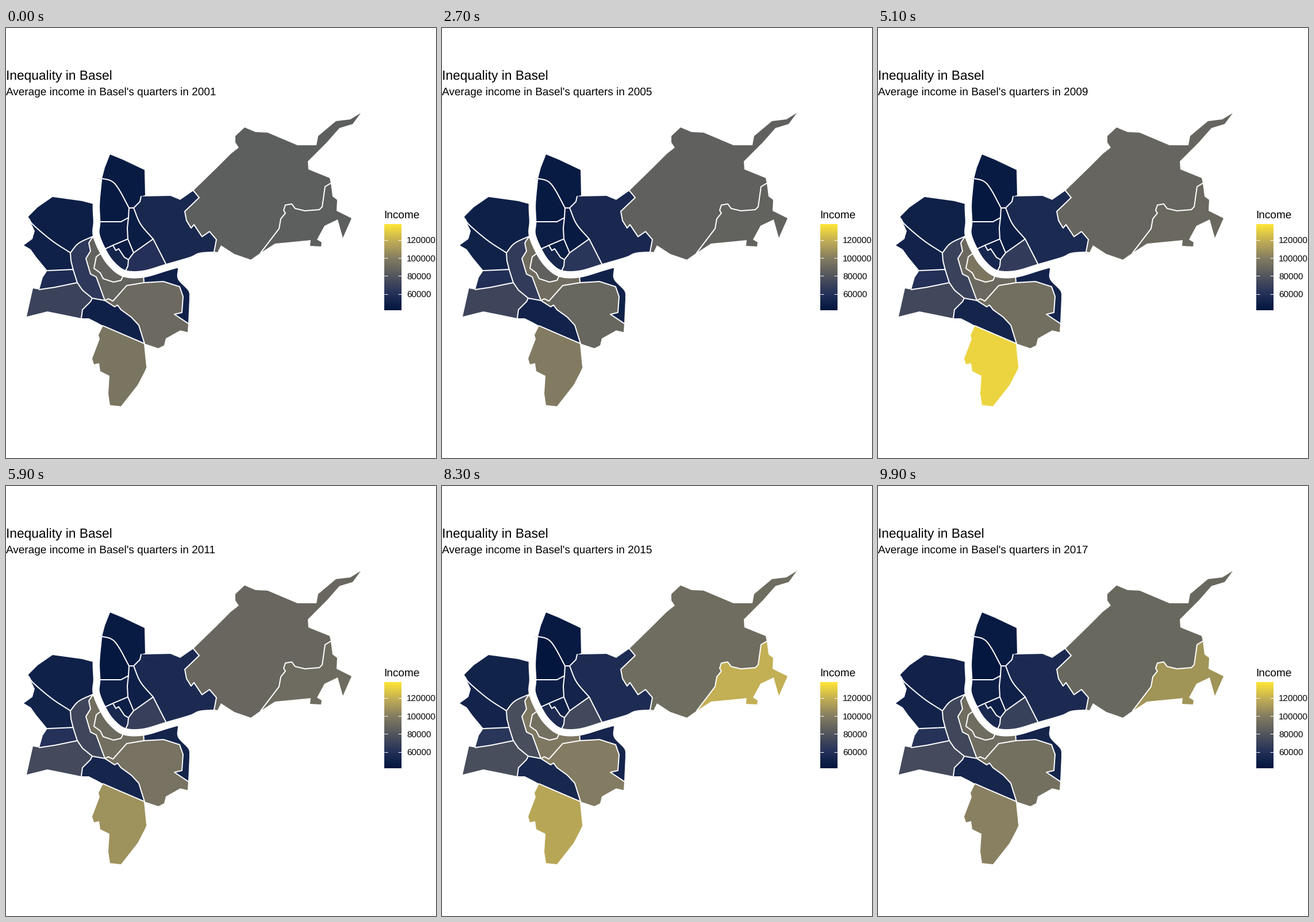
These frames come from a looping animation (748 px wide and 748 px high, 10000 ms). A matplotlib script:

```python
import matplotlib.pyplot as plt
import numpy as np
from matplotlib.animation import FuncAnimation
from matplotlib.collections import LineCollection, PolyCollection
from matplotlib.colors import LinearSegmentedColormap

SIZE = 748
FRAMES, INTERVAL = 100, 100
HOLD, MOVE = 3, 3  # frames a year rests, frames it blends into the next
YEARS = np.arange(2001, 2018)
LOW, HIGH = 41.85, 136.9  # income scale in thousands
STEPS = 8  # curve samples between two key points

plt.rcParams["font.family"] = "Liberation Sans"
plt.rcParams["text.hinting"] = "none"
cmap = LinearSegmentedColormap.from_list(
    "income", ["#02163e", "#263259", "#53565d", "#837c62", "#bfac56", "#ffe536"])

borders, rings, incomes = [], [], []


def path(*xy):
    return np.array(xy, float).reshape(-1, 2)


def smooth(*xy):
    """Catmull-Rom curve through the key points."""
    p = path(*xy)
    p = np.vstack([2 * p[0] - p[1], p, 2 * p[-1] - p[-2]])
    t = np.arange(STEPS)[:, None] / STEPS
    parts = [b + t * (c - a) / 2 + t**2 * (a - 2.5 * b + 2 * c - d / 2)
             + t**3 * (1.5 * (b - c) + (d - a) / 2)
             for a, b, c, d in zip(p, p[1:], p[2:], p[3:])]
    return np.vstack(parts + [p[-2:-1]])


def border(*xy, make=path):
    borders.append(make(*xy))
    return borders[-1]


def river(first, last):
    return stream[first * STEPS:last * STEPS + 1]


def trend(start, end, *shifts):
    """Income that grows until 2015, with (first, last, amount) shifts."""
    p = np.clip((YEARS - 2001) / 14, 0, 1)
    values = start + (end - start) * p**1.5
    for first, last, amount in shifts:
        values[(YEARS >= first) & (YEARS <= last)] += amount
    return values


def quarter(values, *parts):
    """Join the parts end to end, flipping each where needed."""
    ring = parts[0]
    for part in parts[1:]:
        to_start, to_end = np.hypot(*(part[[0, -1]] - ring[-1]).T)
        ring = np.vstack([ring, part[::-1] if to_end < to_start else part])
    rings.append(ring)
    incomes.append(values)


stream = smooth(161, 262, 157, 306, 158, 337, 157, 360, 169, 389, 184, 411,
                206, 427, 239, 428, 281, 416, 322, 404, 338, 397, 363, 395)

# Inner borders, north-east
riehen_hirz = border(326, 283, 336, 295, 311, 319, 314, 335, 322, 348, 327, 342,
                     341, 363, 354, 354, 366, 368, 362, 389)
riehen_bett = border(565, 270, 555, 276, 550, 311, 545, 316, 520, 318, 503, 314,
                     497, 306, 486, 308, 483, 317, 486, 322, 478, 332, 475, 349,
                     443, 391)

# Inner borders, right bank
klein_hirz = border(235, 293, 233, 302, 222, 313)
klein_klyb = border(162, 261, 183, 266, 196, 280, 214, 313, make=smooth)
klein_rose = border(214, 313, 222, 313)
rose_hirz = border(222, 313, 234, 341, 256, 367, make=smooth)
wett_hirz = border(256, 367, 281, 416)
klyb_matt = border(158, 337, 200, 337, 213, 330)
klyb_rose = border(214, 313, 213, 330)
matt_rose = border(213, 330, 211, 348, 212, 367)
matt_old = border(169, 389, 173, 384, 186, 378)
matt_clar = border(186, 378, 212, 367)
clar_old = border(186, 378, 191, 387, 196, 384, 206, 399, 213, 403)
clar_rose = border(212, 367, 222, 391)
clar_wett = border(222, 391, 213, 403)
old_wett = border(213, 403, 212, 414, 206, 427)
rose_wett = border(222, 391, 256, 367)

# Inner borders, left bank
joha_isel = border(40, 332, 48, 343, 80, 370, 112, 391, make=smooth)
joha_ring = border(112, 391, 127, 374, 157, 360, make=smooth)
isel_ring = border(112, 391, 113, 405, 117, 421)
isel_gott = border(72, 422, 117, 420)
gott_ring = border(117, 421, 124, 443)
gott_bach = border(58, 455, 85, 451, 124, 443)
bach_ring = border(124, 443, 133, 456, 150, 470)
bach_gund = border(150, 470, 147, 476, 133, 490, 131, 505)
ring_gund = border(150, 470, 172, 474)
ring_vors = border(157, 360, 149, 366, 144, 374, 147, 388, 139, 401, 147, 428,
                   157, 433, 172, 474)
vors_alts = border(169, 389, 157, 398, 153, 418, 164, 426, 169, 436, 187, 442,
                   200, 439, 206, 427)
vors_brei = border(239, 428, 240, 443)
vors_alba = border(240, 443, 210, 448, 186, 475, 178, 471, 172, 474)
brei_alba = border(240, 443, 274, 441, 302, 450, 308, 467, 306, 495, 293, 498,
                   317, 514)
alba_gund = border(172, 474, 189, 485, 194, 482, 200, 490, 218, 503, 231, 517,
                   241, 549)
gund_brud = border(169, 518, 192, 528, 241, 549)
alba_brud = border(241, 549, 245, 589)

# Quarters, north-east
quarter(trend(84, 91),
        path(326, 283, 366, 244, 391, 219, 405, 208, 399, 199, 399, 188, 415, 173,
             434, 181, 455, 182, 507, 204, 540, 204, 543, 188, 574, 162, 599, 159,
             617, 148, 603, 167, 580, 174, 558, 199, 525, 232, 526, 246, 563, 261),
        riehen_bett, path(426, 403, 397, 393, 374, 378, 368, 390), riehen_hirz)
quarter(trend(84, 95, (2015, 2017, 24), (2016, 2016, 18)),
        path(565, 270, 568, 293, 576, 299, 575, 318, 601, 331, 586, 365, 577, 333,
             554, 344, 541, 368, 549, 373, 548, 380, 529, 379, 530, 369, 468, 375),
        riehen_bett)
quarter(trend(54, 57),
        path(326, 283, 303, 299, 286, 292, 238, 293),
        klein_hirz, rose_hirz, wett_hirz, river(8, 11), riehen_hirz)

# Quarters, right bank
quarter(trend(45.5, 45),
        path(167, 262, 172, 243, 181, 220, 203, 229, 241, 247, 242, 291),
        klein_hirz, klein_rose, klein_klyb)
quarter(trend(45, 42), klein_klyb, klyb_rose, klyb_matt, river(0, 2))
quarter(trend(47, 48.5), klyb_matt, matt_rose, matt_clar, matt_old, river(2, 4))
quarter(trend(46, 49), matt_clar, clar_rose, clar_wett, clar_old)
quarter(trend(52, 56), matt_old, clar_old, old_wett, river(4, 6))
quarter(trend(46.5, 51, (2002, 2009, -2.5)),
        klein_rose, rose_hirz, rose_wett, clar_rose, matt_rose, klyb_rose)
quarter(trend(60, 73), rose_wett, wett_hirz, river(6, 8), old_wett, clar_wett)

# Quarters, left bank
quarter(trend(48, 50.5),
        path(39, 328, 55, 312, 81, 294, 132, 301, 151, 306, 157, 306),
        river(1, 3), joha_ring, joha_isel)
quarter(trend(49.5, 51), joha_isel, isel_ring, isel_gott,
        path(53, 399, 43, 385, 31, 378, 46, 367, 50, 353))
quarter(trend(57, 63), isel_gott, gott_ring, gott_bach, path(64, 434))
quarter(trend(70, 76), gott_bach, bach_ring, bach_gund,
        path(102, 499, 72, 493, 36, 502, 47, 453))
quarter(trend(64, 76),
        isel_ring, gott_ring, bach_ring, ring_gund, ring_vors, joha_ring)
quarter(trend(86, 97, (2004, 2006, 3.2), (2008, 2009, -2.7), (2016, 2016, 7.7),
              (2017, 2017, -3.5)),
        ring_vors, vors_alba, vors_brei, river(6, 7), vors_alts, river(3, 4))
quarter(trend(86.5, 93, (2005, 2005, -4), (2008, 2010, 6.5)),
        vors_alts, river(4, 6))
quarter(trend(49.5, 52.5), vors_brei, brei_alba,
        smooth(319, 470, 317, 457, 299, 437, 299, 418), river(7, 8))
quarter(trend(86, 99, (2001, 2001, 3.5), (2016, 2016, 4), (2017, 2017, -4.3)),
        brei_alba, path(316, 529, 303, 526, 278, 540, 275, 552, 265, 557),
        alba_brud, alba_gund, vors_alba)
quarter(trend(49.5, 53.5), alba_gund, gund_brud, path(158, 512, 144, 505),
        bach_gund, ring_gund)
quarter(trend(95, 115.6, (2007, 2007, 14), (2008, 2010, 26.5), (2016, 2016, 10),
              (2017, 2017, -12.6)),
        gund_brud, alba_brud,
        path(241, 598, 229, 621, 200, 658, 181, 656, 178, 636, 180, 605, 164, 597,
             162, 583, 153, 585, 150, 575, 163, 541, 161, 534))

colors = cmap((np.array(incomes) - LOW) / (HIGH - LOW))

fig = plt.figure(figsize=(SIZE / 72, SIZE / 72), dpi=72, facecolor="white")
ax = fig.add_axes([0, 0, 1, 1])

# Legend bar, ticks and labels
ax.imshow(np.linspace(1, 0, 300)[:, None], cmap=cmap, aspect="auto",
          extent=(657.8, 687.7, 491.2, 341.6), interpolation="bilinear")
for income in range(60000, 120001, 20000):
    y = 462.9 - (income - 60000) / 20000 * 31.45
    ax.hlines([y, y], [657.8, 681.7], [663.8, 687.7], color="white", lw=1)
    ax.text(697.2, y + 5.4, str(income), size=15.2)
ax.text(657.5, 330.6, "Income", size=19)

ax.text(0, 90, "Inequality in Basel", size=22.8)
subtitle = ax.text(0, 117.3, "", size=19)

quarters = ax.add_collection(PolyCollection(rings, edgecolors="none"))
ax.add_collection(LineCollection(borders, colors="white", linewidths=2,
                                 capstyle="round", joinstyle="round"))
ax.plot(*stream.T, color="white", lw=12.5, solid_capstyle="butt", zorder=3)
ax.set(xlim=(0, SIZE), ylim=(SIZE, 0))
ax.axis("off")


def update(frame):
    state, step = divmod(frame, HOLD + MOVE)
    following = (state + 1) % len(YEARS)
    t = max(0, step - HOLD + 1) / MOVE
    quarters.set_facecolor((1 - t) * colors[:, state] + t * colors[:, following])
    year = YEARS[following if t == 1 else state]
    subtitle.set_text(f"Average income in Basel's quarters in {year}")
    return quarters, subtitle


anim = FuncAnimation(fig, update, frames=FRAMES, interval=INTERVAL,
                     repeat=True, repeat_delay=0)
plt.show()
```
